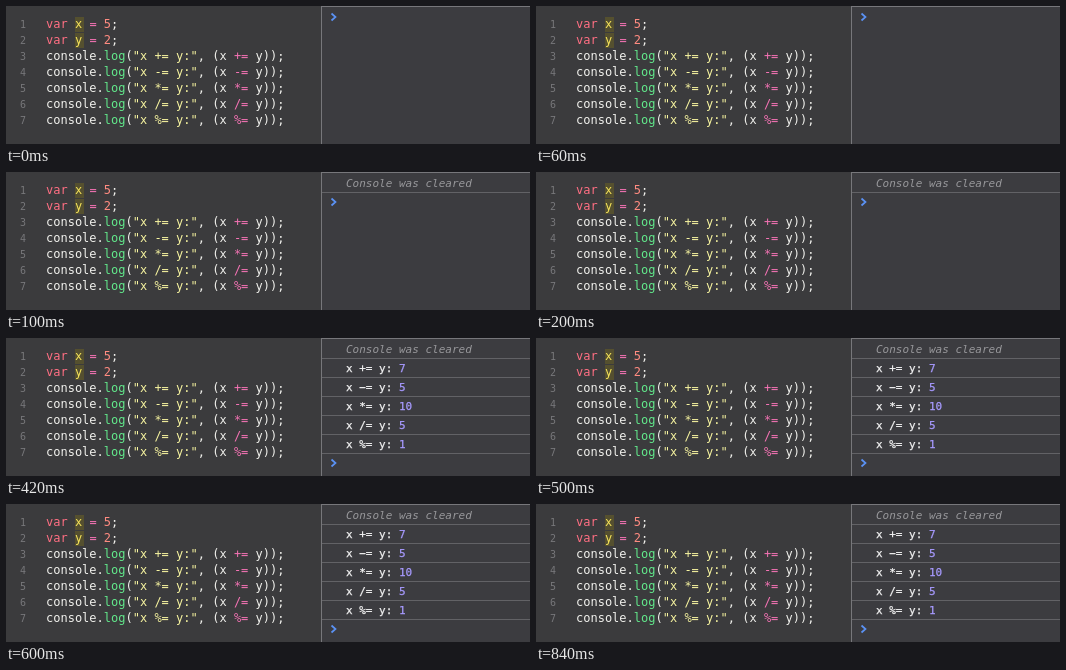
Recreate the animation shown at these times as an HTML page. Size 524 by 138 pixels, loop 1 s.

```html
<!DOCTYPE html>
<html lang="en">
<head>
<meta charset="utf-8">
<title>Assignment operators</title>
<style>
  html, body { margin: 0; width: 100%; height: 100%; overflow: hidden; background: #3b3b3d; }
  svg { display: block; width: 524px; height: 138px; }
  text { font-family: "DejaVu Sans Mono", monospace; white-space: pre; }
  .code { font-size: 12px; fill: #f1f1ed; }
  .number { font-size: 10px; fill: #77777a; text-anchor: end; }
  .log { font-size: 11px; fill: #f4f4f4; stroke: #f4f4f4; stroke-width: .25px; }
  .cleared { font-size: 11px; font-style: italic; fill: #98989b; }
  .keyword { fill: #ff6f83; }
  .variable { fill: #f6e45c; }
  .operator { fill: #f573b5; }
  .value { fill: #ff8b80; }
  .method { fill: #62e88b; }
  .string { fill: #f8f5a0; }
  .result { fill: #a79aff; stroke: #a79aff; }
  .rule { stroke: #626266; }
</style>
</head>
<body>
<svg viewBox="0 0 524 138">
  <rect width="524" height="138" fill="#3b3b3d"/>
  <rect x="316" width="208" height="138" fill="#3c3c40"/>
  <path d="M315.5 0V138M316 .5H524" stroke="#77777b"/>
  <g id="editor"></g>
  <g id="cleared">
    <text class="cleared" x="340" y="15">Console was cleared</text>
    <path class="rule" d="M316 20.5H524"/>
  </g>
  <g id="results"></g>
  <path id="prompt" d="M325.5 -3.5L329.5 0L325.5 3.5" fill="none" stroke="#5b92f5" stroke-width="1.7"/>
</svg>
<script>
const byId = id => document.getElementById(id);
const span = (kind, text) => `<tspan class="${kind}">${text}</tspan>`;
const operations = [["+=", 7], ["-=", 5], ["*=", 10], ["/=", 5], ["%=", 1]];

const declare = (name, value) =>
  `${span("keyword", "var")} ${span("variable", name)} ${span("operator", "=")} ${span("value", value)};`;
const logCall = ([op]) =>
  `console.${span("method", "log")}(${span("string", `"x ${op} y:"`)}, (x ${span("operator", op)} y));`;

const lines = [declare("x", 5), declare("y", 2), ...operations.map(logCall)];
byId("editor").innerHTML = lines.map((line, i) => {
  const y = 22 + i * 16;
  const highlight = i < 2 ? `<rect x="69" y="${y - 11}" width="9" height="15" fill="#55502f"/>` : "";
  return `${highlight}<text class="number" x="20" y="${y}">${i + 1}</text>
    <text class="code" x="40" y="${y}">${line}</text>`;
}).join("");

byId("results").innerHTML = operations.map(([op, value], i) => {
  const y = 34 + i * 19;
  return `<text class="log" x="340" y="${y}">x ${op.replace("-", "−")} y: ${span("result", value)}</text>
    <path class="rule" d="M316 ${y + 5.5}H524"/>`;
}).join("");

function render(time) {
  const t = time % 1000;
  const cleared = t >= 100, printed = t >= 300;
  byId("cleared").style.display = cleared ? "" : "none";
  byId("results").style.display = printed ? "" : "none";
  byId("prompt").setAttribute("transform", `translate(0 ${printed ? 125 : cleared ? 30 : 11})`);
}

const start = performance.now();
function tick() {
  render(performance.now() - start);
  requestAnimationFrame(tick);
}
tick();
</script>
</body>
</html>
```
